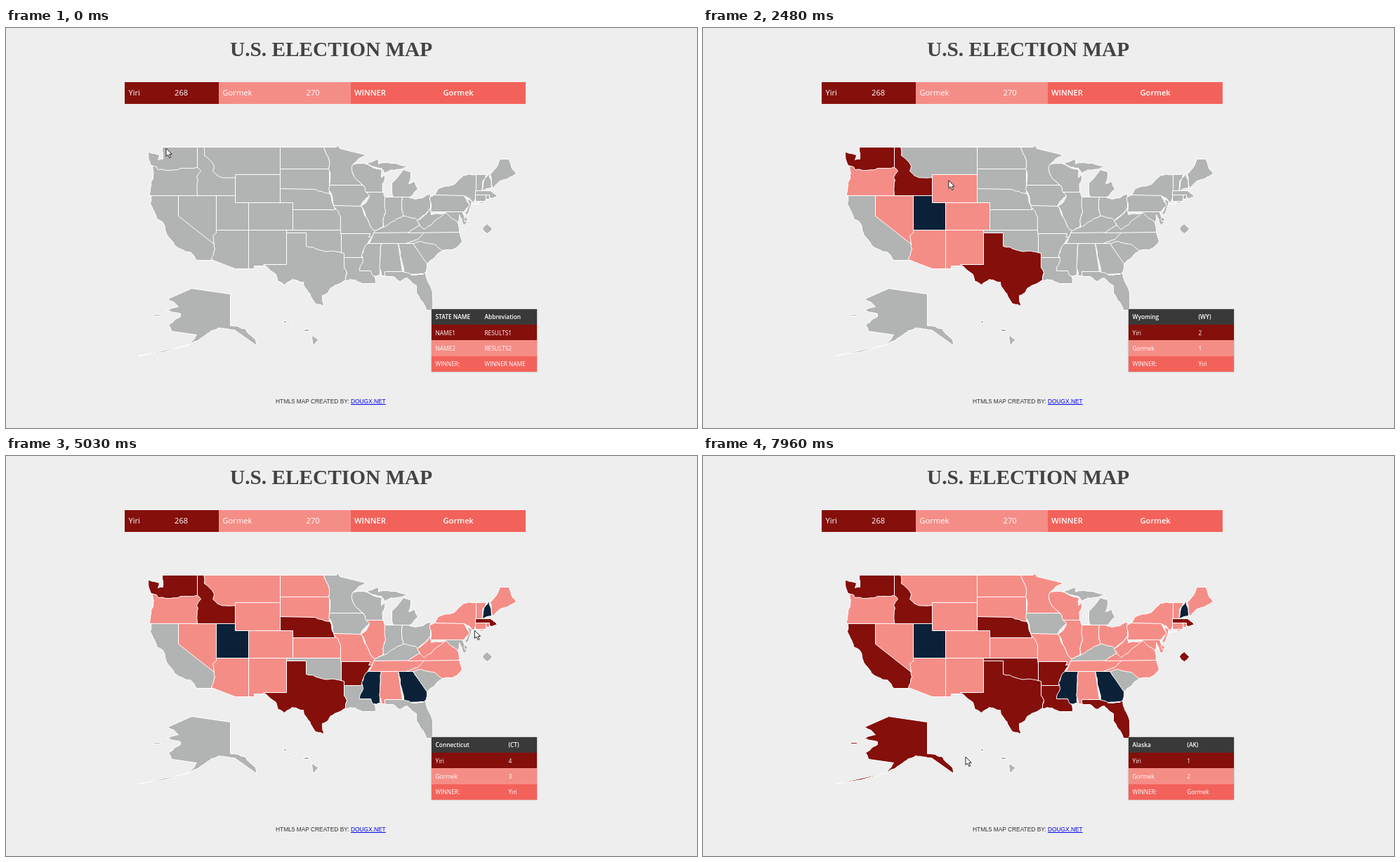
Animation of 984x569 px, one loop 8 s. Source, as an HTML page with a canvas:

```html
<!DOCTYPE html>
<html lang="en">
<head>
<meta charset="utf-8">
<title>U.S. Election Map</title>
<style>
html, body { margin: 0; width: 984px; height: 569px; overflow: hidden; background: #eee; }
body { position: relative; color: #fff; font: 400 8.37px "Open Sans", sans-serif; }
canvas { position: absolute; left: 0; top: 0; }
h1 { position: absolute; left: 319px; top: 13px; margin: 0; color: #434345; white-space: nowrap;
  font: bold 29.3px/34px "Liberation Serif", serif; }
.bar div { position: absolute; top: 77px; height: 30.5px; font-size: 11.16px; line-height: 30px; }
.bar span { position: absolute; left: 5.5px; }
.bar span + span { left: var(--x); }
.bar .win, .head { font-weight: 600; }
.one { background: #840f0b; }
.two { background: #f58d87; }
.win { background: #f3625a; }
table { position: absolute; left: 606px; top: 399.5px; width: 150px; height: 89.5px;
  border-collapse: collapse; box-shadow: 0 0 2px rgba(0,0,0,.35); }
td { padding: 0 5.5px; height: 22.37px; line-height: 11px; white-space: nowrap; }
.head { background: #393939; }
footer { position: absolute; left: 384px; top: 525px; color: #333; white-space: nowrap;
  font: 8.37px/12px "Liberation Sans", sans-serif; }
footer u { color: #00e; }
</style>
</head>
<body>
<canvas id="map" width="984" height="569"></canvas>
<h1>U.S. ELECTION MAP</h1>
<div class="bar">
  <div class="one" style="left:169px;width:134px;--x:71px"><span>Yiri</span><span>268</span></div>
  <div class="two" style="left:303px;width:187.5px;--x:124.5px"><span>Gormek</span><span>270</span></div>
  <div class="win" style="left:490.5px;width:249.5px;--x:132px"><span>WINNER</span><span>Gormek</span></div>
</div>
<table>
  <tr class="head"><td></td><td></td></tr>
  <tr class="one"><td></td><td></td></tr>
  <tr class="two"><td></td><td></td></tr>
  <tr class="win"><td></td><td></td></tr>
</table>
<footer>HTML5 MAP CREATED BY: <u>DOUGX.NET</u></footer>
<script>
const LOOP = 8000, A = 'Yiri', B = 'Gormek';
const GREY = '#b1b4b2';
const fills = { Tie: '#0a2138', [A]: '#f58d87', [B]: '#840f0b' };

// Each state: code, name, votes, corners. Later states cover earlier ones; two corners make a box.
const states = Object.fromEntries(`
CA|California|21-34|207 239,296 239,298 315,294 331,272 331,263 319,240 309,228 290,223 276,215 272,206 250
AZ|Arizona|7-4|295 288,346 288,346 343,327 343,293 330,298 315,294 300
NV|Nevada|4-2|246 239,300 239,300 292,295 296,297 308,246 268
OR|Oregon|5-2|209 197,282 197,282 239,205 239,210 215
WA|Washington|4-8|203 177,219 181,217 188,224 187,223 170,273 170,273 199,253 200,228 203,217 202,215 198,207 196
MT|Montana|2-1|281 170,391 216
ID|Idaho|1-3|273 170,282 170,283 182,297 197,295 204,305 212,327 213,327 239,273 239,274 217,272 213,278 204,273 199
UT|Utah|3-3|300 239,346 288
WY|Wyoming|2-1|327 209,391 249
ND|North Dakota|2-1|391 170,453 170,460 201,391 201
SD|South Dakota|3-0|391 201,461 236
KS|Kansas|4-2|409 258,477 288
NE|Nebraska|2-3|391 229,440 230,462 236,469 259,391 259
CO|Colorado|6-3|346 249,409 288
NM|New Mexico|3-2|346 288,400 288,400 339,354 339,354 343,346 343
OK|Oklahoma|2-5|400 288,478 320
TX|Texas|12-26|400 292,428 292,428 311,450 317,482 320,482 341,486 348,484 359,468 367,451 381,453 396,442 393,429 373,424 362,408 358,397 366,388 361,385 351,367 337,400 337
MN|Minnesota|6-4|453 170,471 170,473 167,476 172,513 181,495 194,493 203,497 213,509 224,461 224,460 201
MO|Missouri|7-3|467 253,505 253,515 272,526 289,521 299,478 299,477 270
IA|Iowa|4-2|461 224,509 224,518 239,509 247,505 254,468 253,460 231
LA|Louisiana|3-5|482 327,510 327,510 346,520 346,526 355,527 364,508 364,498 359,484 360,486 348,482 341
AR|Arkansas|1-5|478 293,519 293,517 298,522 298,508 320,507 327,482 327,482 321,478 320
WI|Wisconsin|7-3|494 195,510 193,536 203,535 213,541 208,537 234,513 234,509 224,497 213,493 203
IL|Illinois|12-8|513 234,538 234,541 263,537 284,526 289,515 272,506 254,518 239
IN|Indiana|11-0|540 241,565 241,566 268,538 285,541 263
OH|Ohio|10-8|565 241,583 244,605 237,605 256,587 274,566 268
MI|Michigan|9-7|513 194,530 187,531 194,553 193,573 198,540 207,535 200;552 241,550 221,566 202,577 206,574 222,583 219,587 230,576 241
KY|Kentucky|5-3|526 289,545 280,566 268,583 271,590 281,573 292,524 292
TN|Tennessee|6-5|524 292,598 291,590 298,570 307,517 307
MS|Mississippi|3-3|516 307,535 307,533 330,534 352,523 353,520 346,504 346,509 332,507 323
AL|Alabama|5-4|535 307,559 307,565 347,541 347,542 353,535 353,533 330
GA|Georgia|8-8|559 307,580 307,600 335,598 350,567 349,563 328
FL|Florida|1-28|540 347,565 347,594 351,598 348,608 379,606 402,600 402,585 377,585 367,572 356,562 361,552 354,541 354
NC|North Carolina|9-6|570 307,590 298,597 291,646 291,650 304,636 316,622 317,580 307
SC|South Carolina|5-4|580 307,592 304,610 308,622 317,600 336
VA|Virginia|8-5|573 292,590 281,610 270,627 262,644 277,646 291
WV|West Virginia|3-2|605 256,606 266,628 262,615 272,606 281,596 287,586 275,600 264
PA|Pennsylvania|13-7|604 241,610 238,653 238,657 247,661 254,652 262,605 262
NY|New York|15-14|611 238,615 230,639 223,652 210,670 209,670 232,667 249,653 239;664 251,686 245,675 250
MD|Maryland|6-4|617 262,651 262,657 277,653 282,646 266,644 278,628 264
NJ|New Jersey|9-5|657 244,664 247,658 267,654 264,660 254
DE|Delaware|2-1|651 262,659 274,654 276
VT|Vermont|2-1|670 209,685 208,678 232,670 232
NH|New Hampshire|2-2|688 206,692 228,678 232,683 214
ME|Maine|3-1|690 209,698 200,704 187,717 187,727 208,704 218,694 229
MA|Massachusetts|3-8|669 232,690 232,700 240,692 243,684 238,669 238
CT|Connecticut|4-3|669 238,684 247
RI|Rhode Island|3-1|684 238,689 244
DC|District of Columbia|1-2|686 279,693 286,686 293,679 286
AK|Alaska|1-2|320 379,320 424,340 428,356 444,357 452,326 430,303 427,282 439,262 451,272 437,237 432,232 423,249 411,249 407,229 402,246 397,231 386,265 371;262 451,226 461,189 467;211 408,220 410
HI|Hawaii|3-1|436 438,446 444,438 452;396 417,400 420;411 423,414 425;425 429,432 432`
  .trim().split('\n').map(row => {
    const [id, name, votes, outline] = row.split('|');
    const [a, b] = votes.split('-').map(Number);
    const rings = outline.split(';').map(parseRing);
    return [id, { name, a, b, win: a === b ? 'Tie' : a > b ? A : B, shape: trace(rings), mid: centre(rings[0]) }];
  }));

function parseRing(text) {
  const ring = text.split(',').map(p => p.split(' ').map(Number));
  if (ring.length > 2) return ring;
  const [[l, t], [r, b]] = ring;
  return [[l, t], [r, t], [r, b], [l, b]];
}

function centre(ring) {
  return [0, 1].map(axis => ring.reduce((sum, p) => sum + p[axis], 0) / ring.length);
}

function noise(seed) {
  const v = Math.sin(seed) * 43758.5453;
  return v - Math.floor(v) - 0.5;
}

// Rivers and coasts wander; surveyed borders (upright, level or very long) stay straight.
function roughen(path, p, q) {
  const dx = q[0] - p[0], dy = q[1] - p[1], len = Math.hypot(dx, dy);
  const straight = Math.min(Math.abs(dx), Math.abs(dy)) < 0.5 || len > 35 || len < 5;
  if (straight) return path.lineTo(...q);
  const sx = p[0] + q[0], sy = p[1] + q[1], seed = sx * 12.9898 + sy * 78.233;
  const m = [sx / 2 + noise(seed) * len * 0.2, sy / 2 + noise(seed + 1) * len * 0.2];
  roughen(path, p, m);
  roughen(path, m, q);
}

function trace(rings) {
  const path = new Path2D();
  for (const ring of rings) {
    path.moveTo(...ring[0]);
    ring.forEach((p, i) => roughen(path, p, ring[(i + 1) % ring.length]));
    path.closePath();
  }
  return path;
}

// Pointer legs: arrival time, resting point, states crossed at an even pace.
const stops = [{ ms: 0, enter: 0, x: 228, y: 171 }];
`820 372 305 WA OR ID WY CO NM
1710 328 295 TX TX NM AZ
2480 350 217 NV UT WY
3140 480 274 MT ND SD NE KS MO
4170 660 226 IL MO AR MS AL GA TN NC VA WV PA NY
4970 676 241 VT NH ME MA RI CT
5830 547 238 NJ DE MD DC PA OH IN
6730 547 358 WI MN ND SD NE KS MO AR MS AL FL
7540 235 245 LA AR OK NM AZ NV CA
7960 374 428 CA AK`.split('\n').forEach(leg => {
  const [end, restX, restY, ...ids] = leg.split(' ');
  const start = stops[stops.length - 1].ms, step = (end - start) / ids.length;
  ids.forEach((id, i) => {
    const [x, y] = i < ids.length - 1 ? states[id].mid : [+restX, +restY];
    stops.push({ ms: start + step * (i + 1), enter: start + step * (i + 0.5), x, y, id });
  });
});

const ctx = document.getElementById('map').getContext('2d');
const cells = document.querySelectorAll('td');
const arrow = new Path2D('M0 0V11.5L2.7 9 4.8 13.6 6.7 12.8 4.7 8.4H8.2Z');

let shown;
function showResults(id) {
  if (id === shown) return;
  shown = id;
  const s = states[id];
  const texts = s
    ? [s.name, `(${id})`, A, s.a, B, s.b, 'WINNER:', s.win]
    : ['STATE NAME', 'Abbreviation', 'NAME1', 'RESULTS1', 'NAME2', 'RESULTS2', 'WINNER:', 'WINNER NAME'];
  cells.forEach((cell, i) => { cell.textContent = texts[i]; });
}

function paint(path, fill, stroke, x, y) {
  ctx.setTransform(1, 0, 0, 1, x, y);
  ctx.fillStyle = fill;
  ctx.strokeStyle = stroke;
  ctx.fill(path);
  ctx.stroke(path);
}

function drawPointer(t) {
  const next = stops.findIndex(p => p.ms > t);
  const q = next < 0 ? stops[stops.length - 1] : stops[next];
  const p = next < 0 ? q : stops[next - 1];
  const k = (t - p.ms) / (q.ms - p.ms || 1);
  paint(arrow, '#fff', '#222', p.x + (q.x - p.x) * k, p.y + (q.y - p.y) * k);
}

function frame() {
  const t = performance.now() % LOOP;
  const visits = stops.filter(p => p.id && p.enter <= t).map(p => p.id);
  ctx.setTransform(1, 0, 0, 1, 0, 0);
  ctx.clearRect(0, 0, 984, 569);
  ctx.lineWidth = 1;
  ctx.lineJoin = 'round';
  for (const [id, s] of Object.entries(states)) {
    paint(s.shape, visits.includes(id) ? fills[s.win] : GREY, '#fff', -0.5, -0.5);
  }
  drawPointer(t);
  showResults(visits[visits.length - 1] || '');
  requestAnimationFrame(frame);
}
frame();
</script>
</body>
</html>
```
